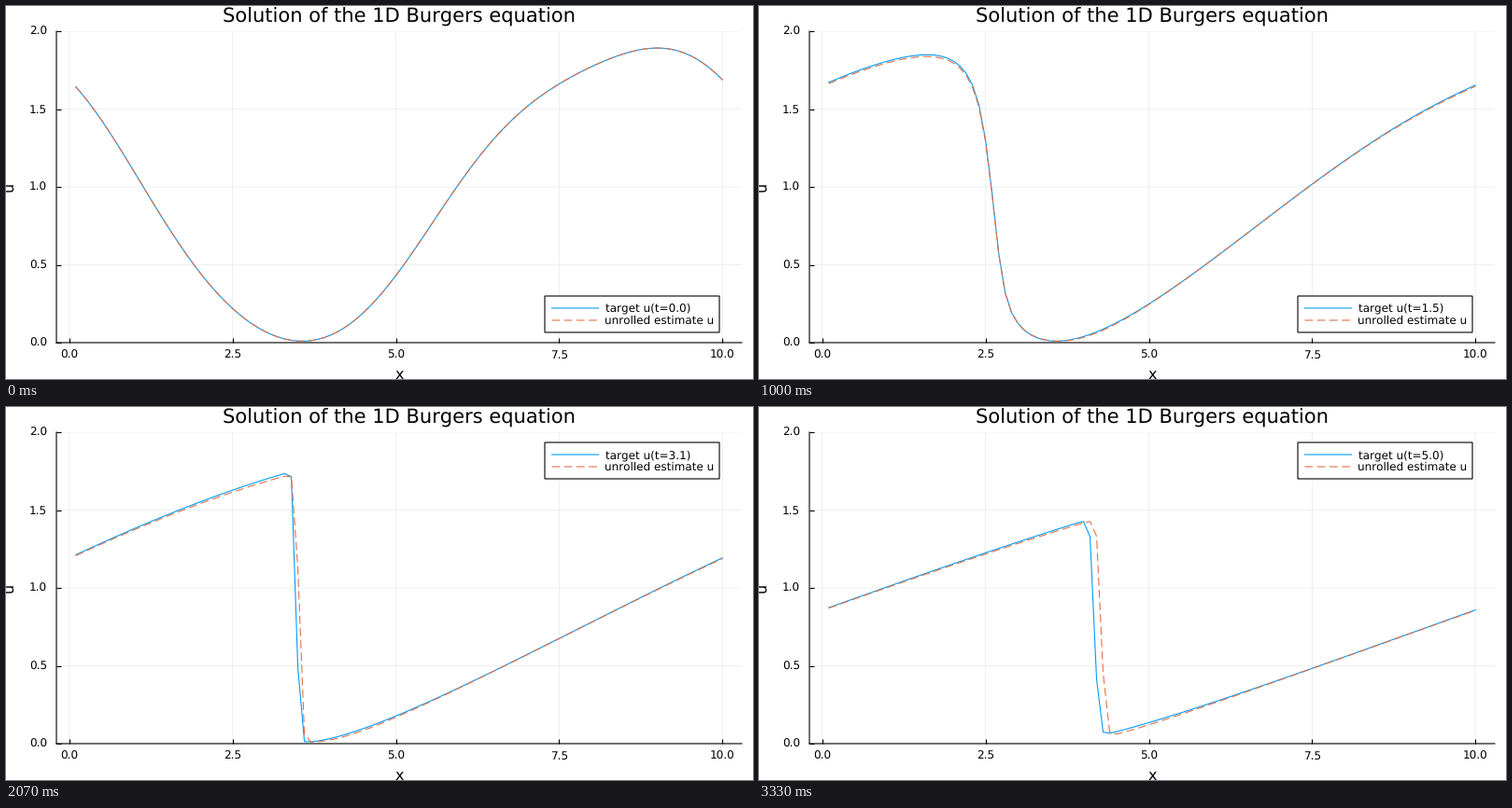
Recreate the animation shown at these times as a matplotlib script. Size 800 by 400 pixels, loop 3390 ms.

```python
import numpy as np
import matplotlib
import matplotlib.pyplot as plt
from matplotlib.animation import FuncAnimation
from matplotlib.patches import Rectangle

matplotlib.rcParams.update({
    "font.family": "DejaVu Sans",
    "text.hinting": "no_hinting",
    "text.hinting_factor": 1,
    "path.snap": False,
})

W, H, DPI = 800, 400, 100
PT = 72 / DPI  # points per pixel
FRAMES, LOOP_MS = 51, 3390
DX, DT, SUBSTEPS = 0.1, 0.01, 10
LEFT, RIGHT, TOP, BOTTOM = 54, 788, 27, 361
BLUE, ORANGE = "#009AFA", "#E26F46"

x = DX * np.arange(1, 101)


def initial_wave():
    phase = np.exp(2j * np.pi * x / 10)
    waves = ((0.598 + 0.7365j) * phase + (0.0595 - 0.0506j) * phase ** 2
             + (0.0308 + 0.0156j) * phase ** 3)
    return 0.9997 + waves.real


# --- upwind Burgers solver on a periodic grid ---
def target_rate(u):
    return -u * (u - np.roll(u, 1)) / DX


def estimate_rate(u):
    drift = 0.024 * np.exp(-u / 0.1)
    loss = 0.008 * (u / 1.85) ** 3 + 0.08 * u * np.exp(-u / 0.1)
    return -(u + drift) * (u - np.roll(u, 1)) / DX - loss


def solve(rate, u):
    states = [u]
    for _ in range(FRAMES - 1):
        for _ in range(SUBSTEPS):
            k1 = rate(u)
            k2 = rate(u + DT / 2 * k1)
            k3 = rate(u + DT / 2 * k2)
            k4 = rate(u + DT * k3)
            u = u + DT / 6 * (k1 + 2 * k2 + 2 * k3 + k4)
        states.append(u)
    return states


u0 = initial_wave()
target = solve(target_rate, u0)
estimate = solve(estimate_rate, u0)

# --- axes ---
fig = plt.figure(figsize=(W / DPI, H / DPI), dpi=DPI, facecolor="white")
ax = fig.add_axes([LEFT / W, 1 - BOTTOM / H,
                   (RIGHT - LEFT) / W, (BOTTOM - TOP) / H])
ax.set_xlim(-0.197, 10.297)
ax.set_ylim(0, 2)
ax.set_xticks(np.linspace(0, 10, 5))
ax.set_yticks(np.linspace(0, 2, 5))
ax.set_axisbelow(True)
ax.grid(color="black", alpha=0.08, lw=0.8 * PT)
ax.tick_params(direction="in", length=5 * PT, width=1.1 * PT,
               labelbottom=False, labelleft=False)
for side, spine in ax.spines.items():
    spine.set_visible(side in ("left", "bottom"))
    spine.set_linewidth(1.1 * PT)

# --- overlay in pixel coordinates, y pointing down ---
page = fig.add_axes([0, 0, 1, 1], zorder=5)
page.set_xlim(0, W)
page.set_ylim(H, 0)
page.axis("off")


def label(px, py, text, size=11.8, ha="center", **style):
    return page.text(px, py, text, fontsize=size * PT, ha=ha,
                     va="baseline", **style)


label(421, 18, "Solution of the 1D Burgers equation", 20.75)
label(421, 399.5, "x", 16.2)
label(8.5, 194, "u", 16.2, rotation=90, rotation_mode="anchor")
for v in ax.get_xticks():
    label(67.8 + 69.95 * v, 378.3, f"{v:.1f}")
for v in ax.get_yticks():
    label(43.8, 365.3 - 167 * v, f"{v:.1f}", ha="right")

# --- curves and legend ---
solid = dict(color=BLUE, lw=1.1 * PT)
dashed = dict(color=ORANGE, lw=1.1 * PT, dashes=(8, 4),
              dash_capstyle="butt")
target_line, = ax.plot(x, u0, **solid)
estimate_line, = ax.plot(x, u0, **dashed)

box = page.add_patch(Rectangle((577, 311), 187, 39, facecolor="white",
                               edgecolor="black", lw=1.1 * PT))
keys = [page.plot([584.5, 634.5], [0, 0], **style)[0]
        for style in (solid, dashed)]
names = [label(641.6, 0, "", ha="left"),
         label(640.6, 0, "unrolled estimate u", ha="left")]


def place_legend(top):
    box.set_y(top)
    for row, (key, name) in enumerate(zip(keys, names)):
        mid = top + 13 + 13 * row
        key.set_ydata([mid, mid])
        name.set_y(mid + 4)


def draw(i):
    target_line.set_ydata(target[i])
    estimate_line.set_ydata(estimate[i])
    names[0].set_text(f"target u(t={i / 10:.1f})")
    # the legend moves up once the wave has left the upper right corner
    corner_free = target[i][x > 7.7].max() < 1.5
    place_legend(38 if corner_free else 311)
    return target_line, estimate_line, box, *keys, *names


anim = FuncAnimation(fig, draw, frames=FRAMES, interval=LOOP_MS / FRAMES,
                     repeat=True, repeat_delay=0, blit=False)
plt.show()
```
